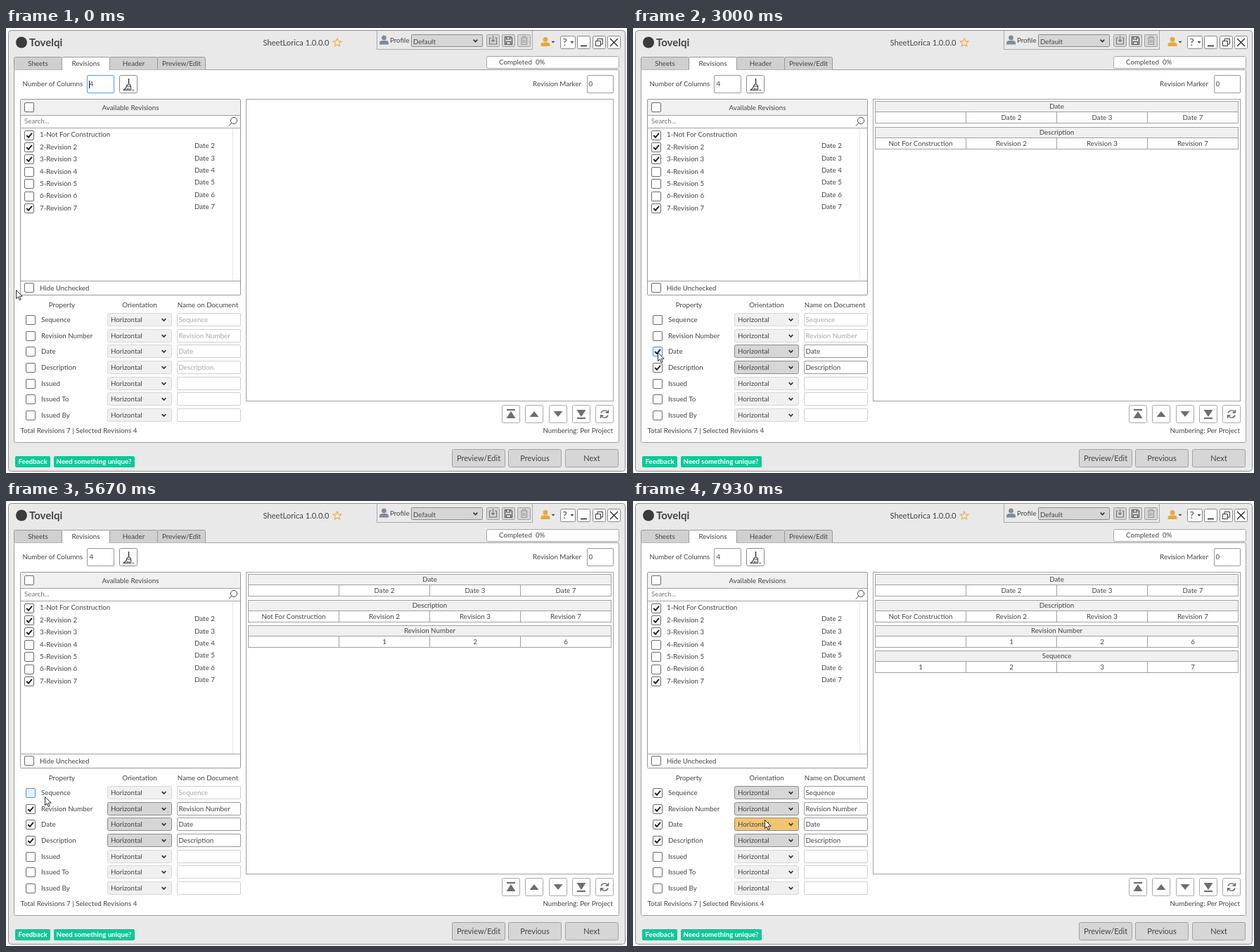
An HTML page that plays this animation: 883 px wide and 634 px high, repeating every 8 s.

```html
<!DOCTYPE html>
<html lang="en">
<head>
<meta charset="utf-8">
<title>Revisions</title>
<style>
html, body { margin: 0; width: 100%; height: 100%; overflow: hidden; background: #fff; }
svg { display: block; width: 883px; height: 634px; }
text { font: 9.75px Lato, "Open Sans", sans-serif; fill: #444; white-space: pre; }
.hint { fill: #a6a6a6; }
.big { font-size: 11px; }
.box { fill: #fff; stroke: #6a6a6a; }
.hover .box { fill: #e8f2fd; stroke: #4a93e0; }
.press .box { fill: #c9e0f8; stroke: #3a80d0; }
.tick { fill: none; stroke: #222; stroke-width: 2; }
.prop .tick { display: none; }
.on .tick { display: inline; }
.combo { fill: #f0f0f0; stroke: #d6d6d6; }
.field { fill: #fff; stroke: #cfcfcf; }
.on .combo { fill: #d6d6d6; stroke: #8a8a8a; }
.on .field { stroke: #999; }
.on .hint { fill: #444; }
.warm .combo { fill: #f2c670; }
</style>
</head>
<body>
<svg id="stage" viewBox="0 0 883 634" xmlns="http://www.w3.org/2000/svg"></svg>
<script>
const stage = document.getElementById('stage');
const LOOP = 8000, TICK = 200 / 3;

// ---- drawing helpers ----
const rect = (x, y, w, h, fill = '#fff', stroke = '#999', r = 0, extra = '') =>
  `<rect x="${x}" y="${y}" width="${w}" height="${h}" rx="${r}" fill="${fill}" stroke="${stroke}" ${extra}/>`;
const text = (x, y, s, anchor = 'start', extra = '') =>
  `<text x="${x}" y="${y}" text-anchor="${anchor}" ${extra}>${s}</text>`;
const path = (d, stroke = '#444', fill = 'none', width = 1.2) =>
  `<path d="${d}" stroke="${stroke}" fill="${fill}" stroke-width="${width}"/>`;
const line = (x1, y1, x2, y2, c = '#a0a0a0') => path(`M${x1} ${y1}L${x2} ${y2}`, c, 'none', 1);
const at = (x, y, s, attrs = '') => `<g transform="translate(${x} ${y})" ${attrs}>${s}</g>`;
const check = (x, y, ticked) => at(x, y,
  '<rect class="box" x="-6.5" y="-6" width="13" height="13" rx="1.5"/>' +
  (ticked ? '<path class="tick" d="M-3.8 .5L-1 3.3L4 -2.700"/>' : ''));
const chevron = (x, y) => path(`M${x - 2.8} ${y - 1.3}l2.8 2.8l2.8 -2.8`, '#333', 'none', 1.7);
const button = (x, y, w, h, s) => rect(x, y, w, h, '#d6d6d6', '#a0a0a0', 2) +
  text(x + w / 2, y + h / 2 + 4, s, 'middle', 'class="big"');
const person = (x, y, c) =>
  `<circle cx="${x}" cy="${y - 3.6}" r="3.4" fill="${c}"/>` +
  path(`M${x - 6.5} ${y + 6}v-2q0 -3.5 4 -3.5h5q4 0 4 3.5v2z`, 'none', c);

function titleBar() {
  const star = Array.from({ length: 10 }, (_, i) => {
    const a = Math.PI * (i / 5 - .5), r = i % 2 ? 2.9 : 6.2;
    return `${(471 + r * Math.cos(a)).toFixed(2)} ${(21 + r * Math.sin(a)).toFixed(2)}`;
  }).join('L');
  return rect(3.5, 3.5, 877, 628, '#e9e9e9', '#8c8c8c', 4) +
    '<circle cx="22" cy="20.5" r="8" fill="#3b3b3b"/>' +
    text(33, 26, 'Tovelqi', 'start', 'style="font-size:15px;font-weight:700"') +
    text(412.5, 24.5, 'SheetLorica 1.0.0.0', 'middle', 'style="font-size:11.2px"') +
    path(`M${star}Z`, '#e8ae45', 'none', 1.1) +
    path('M527.5 4V30.5H748.5V4', '#aaa', '#e9e9e9', 1) +
    person(537.5, 17.5, '#7f8b99') + text(546, 21.3, 'Profile') +
    rect(576.5, 9.5, 101, 17, '#d6d6d6', '#8a8a8a', 1) + text(579, 22.5, 'Default') + chevron(667.5, 18) +
    [683.5, 705.5, 727.5].map(x => rect(x, 9.5, 18, 17, '#d6d6d6', '#a0a0a0', 1)).join('') +
    path('M690 14H687.500V23H697.500V14H695M692.500 11V19M690 17l2.500 2.500l2.500 -2.500', '#777') +
    path('M709.500 12.500H717.500L719.500 14.500V23.500H709.500ZM711.500 12.500V16H716.500V12.500M711.500 23.500V19.500H717.500V23.500', '#555') +
    path('M732 14H741.500M735 13.500V12H738.500V13.500M733 14V23.500H740.500V14M735.500 16.500V21.500M738 16.500V21.500', '#999') +
    person(767, 20, '#e6a93c') + path('M775.500 18.800h5l-2.500 2.800z', 'none', '#444') +
    [788.5, 812.5, 834.5, 855.5].map((x, i) => rect(x, 11.5, i ? 18 : 21, 18, '#fff', '#8a8a8a', 2)).join('') +
    text(791.5, 25, '?', 'start', 'style="font-size:14px"') + path('M802.500 19h5l-2.500 2.800z', 'none', '#333') +
    path('M817 25.500H826', '#222', 'none', 1.5) +
    path('M838.500 18.500H845.500V25.500H838.500ZM841 18V15.500H848.500V23H846', '#333', 'none', 1) +
    path('M859 15L870 26M870 15L859 26', '#222', 'none', 1.3);
}

function frame() {
  const tabs = ['Sheets', 'Revisions', 'Header', 'Preview/Edit'];
  return rect(11.5, 59.5, 860, 531, '#fff', '#a0a0a0', 2) +
    tabs.map((s, i) => {
      const x = 11.5 + i * 68, live = i === 1;
      return path(`M${x} 59.500V43.500q0 -2 2 -2h64q2 0 2 2V59.500`, '#9a9a9a', live ? '#fff' : '#d0d0d0', 1) +
        (live ? line(x + .5, 59.5, x + 67.5, 59.5, '#fff') : '') + text(x + 34, 53.6, s, 'middle');
    }).join('') +
    rect(683.5, 40.5, 188, 17, '#fff', '#a8a8a8', 2) + text(701, 52, 'Completed&#160; 0%') +
    text(23.5, 83.4, 'Number of Columns') +
    rect(115.5, 67.5, 38, 25, '#fff', '#999', 1.5, 'id="count"') + text(118.5, 83.4, '4') +
    '<rect id="caret" x="118" y="75" width="1" height="11" fill="#111"/>' +
    rect(161.5, 67.5, 25, 25, '#fff', '#8a8a8a', 2) +
    path('M174.500 72V79.500', '#333', 'none', 1.5) +
    path('M171.500 83Q172 80 174.500 80Q177 80 177.500 83ZM171.500 83Q170.500 87 166.500 88.500H177.500V83M172 88.500l1 -3M175 88.500v-3M179.500 88.500h2.500') +
    text(818, 83.4, 'Revision Marker', 'end') +
    rect(826.5, 67.5, 37, 25, '#fff', '#999', 1.5) + text(828.5, 83.4, '0') +
    text(20.5, 577.3, 'Total Revisions 7 | Selected Revisions 4') +
    text(863, 577.3, 'Numbering: Per Project', 'end') +
    rect(13, 610, 50, 16, '#0cc998', 'none', 2) + rect(68, 610, 115, 16, '#0cc998', 'none', 2) +
    [[38, 'Feedback'], [125, 'Need something unique?']].map(([x, s]) =>
      text(x, 621, s, 'middle', 'style="fill:#fff;font-weight:700;font-size:9.7px"')).join('') +
    button(634.5, 600.5, 75, 25, 'Preview/Edit') +
    button(714.5, 600.5, 75, 25, 'Previous') +
    button(795.5, 600.5, 75, 25, 'Next');
}

function revisionList() {
  let s = rect(20.5, 101.5, 313, 279, '#fff', '#969696', 1) + rect(21, 102, 312, 22, '#f0f0f0', 'none') +
    [124.5, 142.5, 360.5].map(y => line(21, y, 333, y)).join('') +
    line(322.5, 143, 322.5, 360, '#e6e6e6') +
    check(33, 112.5) + text(177, 116.6, 'Available Revisions', 'middle') +
    text(26, 136, 'Search...', 'start', 'style="fill:#777"') +
    '<circle cx="324" cy="132" r="4.600" fill="none" stroke="#444"/>' + line(320.8, 135.3, 317, 139.5, '#444') +
    check(33, 369.5) + text(48, 373.8, 'Hide Unchecked');
  for (let i = 1; i <= 7; i++) {
    const y = 135.1 + i * 17.4;
    s += check(33, Math.round(y - 1) + .5, i < 4 || i === 7) +
      text(48, y + 2.8, i === 1 ? '1-Not For Construction' : `${i}-Revision ${i}`) +
      (i > 1 ? text(268, y + 1.3, `Date ${i}`) : '');
  }
  return s;
}

const names = ['Sequence', 'Revision Number', 'Date', 'Description', 'Issued', 'Issued To', 'Issued By'];
const rowY = i => 415.5 + i * 22.67;

function properties() {
  return text(79.5, 398, 'Property', 'middle') + text(190, 398, 'Orientation', 'middle') +
    text(287, 398, 'Name on Document', 'middle') +
    names.map((name, i) => at(0, Math.round(rowY(i) - .5) + .5,
      check(35, 0, true) + text(50, 3, name, 'start', 'data-label') +
      '<rect class="combo" x="144.500" y="-9" width="91" height="18" rx="2"/>' +
      text(149, 3, 'Horizontal') + chevron(224.5, 0) +
      '<rect class="field" x="243.500" y="-9" width="90" height="18" rx="1.500"/>' +
      (i < 4 ? text(245.5, 3, name, 'start', 'class="hint"') : ''), 'class="prop"')).join('');
}

// Preview groups, in the order in which they are switched on.
const groups = [
  { row: 2, press: 1270, done: 1400, cells: ['', 'Date 2', 'Date 3', 'Date 7'] },
  { row: 3, press: 2070, done: 2200, cells: ['Not For Construction', 'Revision 2', 'Revision 3', 'Revision 7'] },
  { row: 1, press: 3530, done: 3670, cells: ['', '1', '2', '6'] },
  { row: 0, press: 6200, done: 6330, cells: ['1', '2', '3', '7'] }
];

function preview() {
  const bar = 'M-6 0H6', up = 'M-6.500 4L0 -4L6.500 4Z', down = 'M-6.500 -4L0 4L6.500 -4Z';
  const solid = d => path(d, 'none', '#6e6e6e');
  const rule = y => at(0, y, path(bar, '#6e6e6e', 'none', 2.2));
  const icons = [
    rule(-6) + solid('M-6.500 6L0 -4L6.500 6Z'), solid(up), solid(down),
    solid('M-6.500 -6L0 4L6.500 -6Z') + rule(6),
    path('M-5 -1.500A5.200 5.200 0 0 1 4.500 -2.500M5.500 -6V-2H1.500M5 1.500A5.200 5.200 0 0 1 -4.500 2.500M-5.500 6V2H-1.500', '#666', 'none', 1.4)
  ];
  return rect(341.5, 101.5, 522, 430, '#fff', '#a0a0a0') +
    icons.map((icon, i) => at(Math.round(718 + i * 33.25), 550,
      rect(-12.5, -12.5, 25, 25, '#fff', '#a8a8a8', 2) + icon)).join('') +
    groups.map((g, i) => at(0, Math.round(104.3 + i * 36.33) + .5,
      rect(344.5, 0, 516, 15, '#f0f0f0', '#a0a0a0') + rect(344.5, 15, 516, 16, '#fff', '#a0a0a0') +
      text(602.5, 10.8, names[g.row], 'middle') +
      g.cells.map((c, k) => text(409 + k * 129, 26.7, c, 'middle') +
        (k ? line(344.5 + k * 129, 15, 344.5 + k * 129, 31) : '')).join(''), 'data-group')).join('');
}

stage.innerHTML = titleBar() + frame() + revisionList() + properties() + preview() +
  '<path id="cursor" d="M.500 .500V12.500L3.300 9.900L5.200 14.500L7.200 13.600L5.300 9.200H9.200Z" fill="#fff" stroke="#111" stroke-width=".9"/>';

const find = id => document.getElementById(id);
const caret = find('caret'), count = find('count'), cursor = find('cursor');
const rows = [...stage.querySelectorAll('.prop')];
const groupEls = [...stage.querySelectorAll('[data-group]')];
const labelEnds = rows.map(r => 50 + r.querySelector('[data-label]').getComputedTextLength());

// Pointer stops: time, x, y
const stops = [
  [0, 14, 373], [800, 36, 461], [1400, 36, 461], [1600, 36, 484], [2330, 36, 484],
  [2870, 35, 468], [3200, 35, 453], [3470, 33, 434], [3800, 33, 434], [3870, 34, 434],
  [3930, 34, 434], [4000, 34, 433], [4200, 34, 433], [4800, 544, 304], [5070, 445, 382],
  [5330, 170, 422], [5470, 85, 431], [5670, 54.5, 420.5], [5930, 39, 417], [6000, 38, 417],
  [6330, 38, 417], [6730, 236, 464], [6800, 236, 464], [7130, 212, 451], [7400, 198, 477],
  [7670, 191, 470], [7930, 187, 454], [8000, 187, 454]
];

function pointer(t) {
  const i = Math.max(1, stops.findIndex(s => s[0] >= t));
  const [t0, x0, y0] = stops[i - 1], [t1, x1, y1] = stops[i];
  const k = (t - t0) / (t1 - t0);
  return [x0 + (x1 - x0) * k, y0 + (y1 - y0) * k];
}

function draw(now) {
  const step = Math.floor((now % LOOP + 3.4) / TICK);
  const t = Math.min(LOOP, Math.round(step * TICK / 10) * 10);
  const [x, y] = pointer(t);
  cursor.setAttribute('transform', `translate(${Math.round(x)} ${Math.round(y)})`);

  const focused = t < 1270;
  count.setAttribute('stroke', focused ? '#569de5' : '#999');
  caret.style.display = focused && (t < 70 || t >= 600 && t < 1130) ? '' : 'none';

  rows.forEach((el, i) => {
    const g = groups.find(v => v.row === i), dy = Math.abs(y - rowY(i));
    const on = !!g && t >= g.done;
    el.classList.toggle('on', on);
    el.classList.toggle('press', !!g && t >= g.press && !on);
    el.classList.toggle('hover', dy < 7.5 && x >= 28 && x <= labelEnds[i]);
    el.classList.toggle('warm', on && dy < 9 && x >= 145 && x <= 235);
  });
  groupEls.forEach((el, i) => { el.style.display = t >= groups[i].done ? '' : 'none'; });
}

const start = performance.now();
function loop() {
  draw(performance.now() - start);
  requestAnimationFrame(loop);
}
loop();
</script>
</body>
</html>
```
